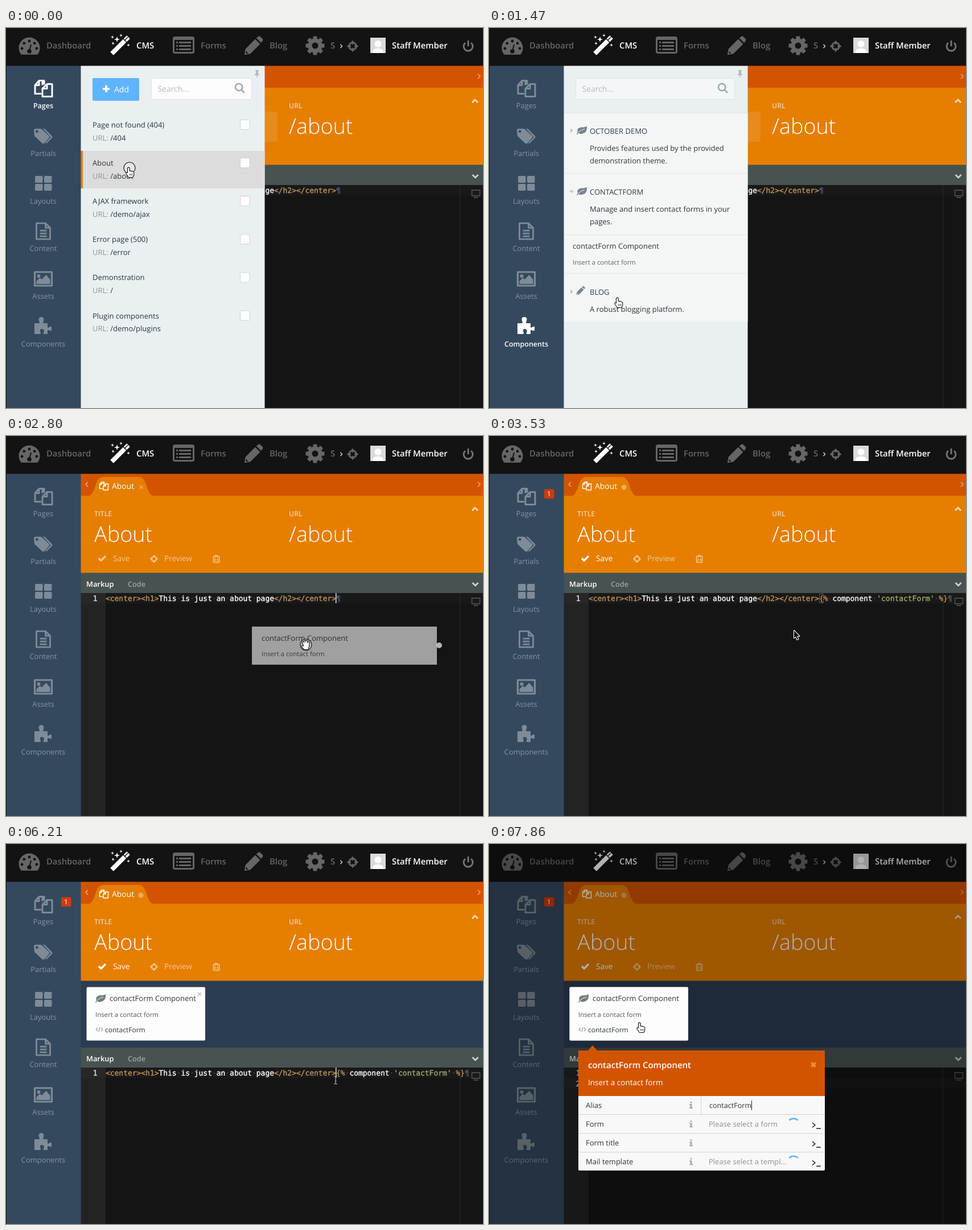
Write an HTML page with a canvas that moves like this. It is 838x668 px and loops after 8 s.

```html
<!DOCTYPE html>
<html lang="en">
<head>
<meta charset="utf-8">
<title>CMS editor</title>
<style>
html, body { margin: 0; width: 100%; height: 100%; overflow: hidden; background: #141414; }
canvas { display: block; }
</style>
</head>
<body>
<canvas id="stage" width="838" height="668"></canvas>
<script>
const ctx = document.getElementById('stage').getContext('2d');
// Unrounded glyph advances
ctx.textRendering = 'geometricPrecision';
const SANS = '"Open Sans", "Noto Sans", sans-serif';
const MONO = '12.94px "DejaVu Sans Mono", monospace';
const DIM = '#666', INK = '#2b373e', FADED = 'rgba(255,255,255,.57)';
const LOOP = 8000, STEP = 148, LAST = 53;

function text(s, x, y, size, color, weight = 400, align = 'left') {
  ctx.font = `${weight} ${size}px ${SANS}`;
  ctx.fillStyle = color;
  ctx.textAlign = align;
  ctx.fillText(s, x, y);
}

function box(x, y, w, h, color, r = 0, edge) {
  ctx.beginPath();
  ctx.roundRect(x, y, w, h, r);
  ctx.fillStyle = color;
  ctx.fill();
  if (edge) {
    ctx.strokeStyle = edge;
    ctx.lineWidth = 1;
    ctx.stroke();
  }
}

function dot(x, y, r, color) {
  ctx.beginPath();
  ctx.arc(x, y, r, 0, 7);
  ctx.fillStyle = color;
  ctx.fill();
}

// Filled when line is 0, otherwise stroked
function icon(d, x, y, color, line = 0, scale = 1) {
  ctx.save();
  ctx.translate(x, y);
  ctx.scale(scale, scale);
  const p = new Path2D(d);
  ctx.fillStyle = ctx.strokeStyle = color;
  ctx.lineWidth = line;
  ctx.lineJoin = 'round';
  if (line) ctx.stroke(p); else ctx.fill(p, 'evenodd');
  ctx.restore();
}

const ART = {
  pages: 'M-2-6V-14H-8L-15-6V9H-4M-15-6H-8V-14M-2 0L6-8H15V14H-2ZM-2 0H6V-8M-2-14H1V-7',
  tags: 'M-16-10Q-16-13-13-13H-4L-2-12L11 0Q12 2 11 3L2 13Q0 14-2 12L-15 0ZM-13-8a2.3 2.3 0 1 0 4.6 0a2.3 2.3 0 1 0-4.6 0M0-13H3L16 0Q17 2 16 3L6 13L4 12L13 3Q14 2 13 1Z',
  doc: 'M-12-14H4L12-6V14H-12ZM4-14V-6H12M-6-1H6M-6 4H6M-6 9H6',
  frame: 'M-15-12H15V12H-15Z',
  hills: 'M-12 9V4L-6-2L-3 1L5-7L12 1V9ZM-11-5a3 3 0 1 0 6 0a3 3 0 1 0-6 0',
  puzzle: 'M-15-4H-7Q-5-5-7-8Q-9-15-3-15Q3-15 1-8Q-1-5 1-4H8V3Q10 5 12 2Q16 1 15 6Q15 11 12 9Q9 7 8 9V15H1Q0 13 2 10Q1 6-2 6Q-6 6-5 10Q-3 13-5 15H-15Z',
  pencil: 'M-17 17L-15 6L3-12L12-3L-6 15ZM5-14L9-17Q11-18 13-16L17-12Q18-10 16-8L14-5ZM-14 10L-10 14L-14 15Z',
  cross: 'M-6 0a6 6 0 1 0 12 0a6 6 0 1 0-12 0M0-9V-3M0 3V9M-9 0H-3M3 0H9',
  leaf: 'M-9 7L-7 4Q-10-4 0-5Q6-5 9-7Q10 4 2 6Q-3 8-6 5L-8 8Z',
  pin: 'M-3-6H3V-5L2-4V0L5 3H.7V7H-.7V3H-5L-2 0V-4L-3-5Z',
  trash: 'M-6-4H6M-2-4V-6H2V-4M-5-4V6H5V-4M-2-1V4M2-1V4',
  code: 'M-3-3L-6 0L-3 3M3-3L6 0L3 3M1-4L-1 4',
  times: 'M-3-3L3 3M3-3L-3 3',
  up: 'M-5 3L0-2L5 3',
  down: 'M-5-3L0 2L5-3',
  left: 'M2-4L-2 0L2 4',
  right: 'M-2-4L2 0L-2 4',
  hand: 'M-4-7Q-4-8.3-2.7-8.3Q-1.3-8.3-1.3-6.5V-2Q0-3 1.3-1.8Q2.6-2.5 3.8-1.2Q6.2-1.5 6.2 1V4L4.5 8H-2.5L-6.5 2Q-7 0-5 .5L-4 1.5Z',
  fist: 'M-4 1L-6-4Q-5-6-3.6-4L-2.5-2L-3-6Q-1.8-8-.8-6L-.4-3L.4-7Q1.8-8 2.3-6L2-2L4-5Q6-5 5.4-3L5 3L3.5 8H-3L-7 3Q-7 1-4 3Z',
  arrow: 'M-4-8V5L-1 2.4L1.2 8L3.4 7L1 1.8H5.2Z',
  beam: 'M-3-7Q0-7 0-5Q0-7 3-7M0-5V5M-3 7Q0 7 0 5Q0 7 3 7M-1.5 2H1.5'
};

function header() {
  box(0, 0, 838, 66.5, '#131313');
  // Gauge
  ctx.beginPath();
  ctx.arc(41, 35, 18.5, 2.45, 0.69);
  ctx.closePath();
  ctx.fillStyle = DIM;
  ctx.fill();
  for (let i = 0; i < 5; i++) {
    const a = Math.PI * (1 + i / 4);
    dot(41 + 13 * Math.cos(a), 36 + 13 * Math.sin(a), 2.4, '#131313');
  }
  icon('M0 0L3-12', 41, 41, '#131313', 2);
  dot(41, 41, 3.8, '#131313');
  text('Dashboard', 71, 36, 14.8, DIM, 600);
  // Wand
  icon('M-15 15L14-14', 201, 30, '#fff', 8);
  icon('M5-11L11-5M13-14L7-8', 201, 30, '#131313', 1.5);
  for (const [x, y, r] of [[187, 16, 3], [195, 20, 5], [202, 13, 3], [188, 27, 3], [215, 30, 3]]) {
    const q = r / 4;
    icon(`M0-${r}L${q}-${q}L${r} 0L${q} ${q}L0 ${r}L-${q} ${q}L-${r} 0L-${q}-${q}Z`, x, y, '#fff');
  }
  text('CMS', 229, 36, 14.8, '#fff', 600);
  // List
  box(293, 15, 38, 30, DIM, 4);
  box(296, 21, 32, 21, '#131313');
  for (let y = 24; y < 40; y += 6) {
    box(299, y, 3, 3, DIM);
    box(304, y, 21, 3, DIM);
  }
  text('Forms', 342, 36, 14.8, DIM, 600);
  icon(ART.pencil, 435, 31, DIM, 0, .95);
  text('Blog', 463, 36, 14.8, DIM, 600);
  // Gear
  dot(543, 31, 12.8, DIM);
  for (let i = 0; i < 8; i++) {
    ctx.save();
    ctx.translate(543, 31);
    ctx.rotate(i * Math.PI / 4);
    box(-3.5, -16.5, 7, 6, DIM, 1);
    ctx.restore();
  }
  dot(543, 31, 5.5, '#131313');
  text('S', 570, 36, 14.8, DIM, 600);
  icon(ART.right, 589, 32, '#ddd', 1.7, .8);
  icon(ART.cross, 609, 32, DIM, 2.8, 1.05);
  // Avatar
  box(640, 17, 27, 27, '#dadada');
  dot(653.5, 28, 6, '#fff');
  icon('M-10 13Q-10 6-3 5H3Q10 6 10 13Z', 653.5, 31, '#fff');
  text('Staff Member', 678, 36, 14.8, '#fff', 600);
  icon('M-5-6A8 8 0 1 0 5-6M0-10V0', 812, 32, '#777', 2.8);
}

function sidebar(active, badge) {
  box(1, 66, 130.5, 602, '#34495e');
  const names = ['Pages', 'Partials', 'Layouts', 'Content', 'Assets', 'Components'];
  names.forEach((name, i) => {
    const on = i === active, c = on ? '#fff' : '#7e8b98', y = 106.5 + i * 83.4;
    if (i === 0) icon(ART.pages, 66, y, c, 3);
    if (i === 1) icon(ART.tags, 65, y, c);
    if (i === 2) for (let k = 0; k < 4; k++) box(51 + k % 2 * 16, 260 + (k >> 1) * 14, 13.5, 12, c, 2);
    if (i === 3) icon(ART.doc, 65.5, y + .5, c, 2.8);
    if (i === 4) {
      icon(ART.frame, 65.5, 441, c, 3.2);
      icon(ART.hills, 65.5, 441, c);
    }
    if (i === 5) icon(ART.puzzle, 65, 523, c);
    text(name, 65.5, 141 + i * 83.8, on ? 12.5 : 12.9, on ? '#fff' : '#8593a0', on ? 600 : 400, 'center');
  });
  if (badge) {
    box(97, 93.5, 17.5, 16.5, '#d23a0c', 2);
    text('1', 105.5, 106, 12, '#fff', 500, 'center');
  }
}

// The thin outline gives the heavier strokes of the editor face
function codeLine(parts, x, y) {
  ctx.font = MONO;
  ctx.textAlign = 'left';
  ctx.lineWidth = .4;
  const w = ctx.measureText('m').width;
  for (const [s, color] of parts) for (const ch of s) {
    if (ch === ' ') {
      ctx.fillStyle = '#555';
      ctx.fillText('·', x, y);
    } else {
      ctx.fillStyle = ctx.strokeStyle = color;
      ctx.fillText(ch, x, y);
      ctx.strokeText(ch, x, y);
    }
    x += w;
  }
}

const TAG = '#bd9157', END = ['¶', '#4b5568'];
const HTML = [['<center><h1>', TAG], ['This is just an about page', '#f8f8f8'], ['</h2></center>', TAG]];
const TWIG = [['{%', TAG], [' component ', '#f8f8f8'], ["'contactForm'", '#9bab65'], [' %}', TAG]];

function editor(n, top) {
  const dropped = n >= 24, split = n >= 44, y = top + 50;
  box(131, top + .5, 707, 36, '#475352');
  text('Markup', 141, top + 24.5, 12.9, '#fff', 600);
  text('Code', 214, top + 24.5, 12.7, '#9aa5a4', 600);
  icon(ART.down, 824.5, top + 21, '#ccd2d1', 2.8);
  box(131, top + 36, 707, 668, '#141414');
  box(131, top + 36, 44, 668, '#232323');
  box(797, top + 36, 1, 668, '#262626');
  box(131, top + 36 + (split ? 18.5 : 0), 707, 18.5, 'rgba(255,255,255,.02)');
  const digit = [['1', '#e2e2e2']];
  codeLine(digit, 152.7, y);
  if (split) {
    codeLine([['2', '#e2e2e2']], 152.7, y + 18.5);
    codeLine([...HTML, END], 175, y);
    codeLine([...TWIG, END], 175, y + 18.5);
  } else {
    codeLine([...HTML, ...(dropped ? TWIG : []), END], 175, y);
  }
  if (dropped && n < 40) {
    ctx.strokeStyle = '#555';
    ctx.lineWidth = 1;
    ctx.strokeRect(580.5, top + 37.5, 7, 16);
  }
  if ((n >= 17 && n < 24) || (n >= 40 && !split)) box(579, top + 36, 1.5, 18, '#ddd');
  if (split) box(175, top + 55, 1.5, 18, '#ddd');
  icon('M-7-6H7V4H-7ZM-4 7H4', 825.5, top + 51, '#4a4a4a', 1.8);
}

function card(x) {
  box(x + .5, 251.5, 208.5, 94, '#fdfdfd', 2);
  icon(ART.leaf, x + 25, 271, '#727f80');
  icon('M-6 4Q-1-1 5-2', x + 25, 271, '#fdfdfd', 1);
  text('contactForm Component', x + 41, 276, 13, INK);
  text('Insert a contact form', x + 16, 303.5, 11.4, '#4b5558');
  icon(ART.code, x + 23, 326, '#90999c', 1.2);
  text('contactForm', x + 33, 330.5, 12, INK);
}

function page(n, top) {
  const dirty = n >= 24, act = dirty ? '#fff' : FADED;
  box(131, 66, 707, 39, '#d35400');
  box(131, 105, 707, 140, '#e67e00');
  icon('M147 105Q153 101 157 88Q161 72 171 72H233Q243 72 247 88Q251 101 257 105Z', 0, 0, '#e67e00');
  icon(ART.left, 142, 85, '#f0a56d', 1.6);
  icon(ART.right, 831, 85, '#f0a56d', 1.6);
  icon(ART.pages, 172, 88, '#fff', 3, .5);
  text('About', 186, 93, 13.9, '#fff', 500);
  if (dirty) dot(237, 90, 4.5, '#efab5c');
  else icon(ART.times, 237.5, 90, '#f3bd80', 1.3, .9);
  icon(ART.up, 824, 128, '#f8dcbb', 2.8);
  text('TITLE', 155, 141, 12.3, '#f7cfa2', 600);
  text('URL', 497, 141, 12.3, '#f7cfa2', 600);
  if (n < 17) box(155, 147, 322, 53, 'rgba(255,255,255,.1)', 3);
  text('About', 155, 186, 37.8, '#fff', 300);
  text('/about', 497, 186, 37.8, '#fff', 300);
  icon('M-6 0L-2 4L6-4', 169, 215, act, 3.3);
  text('Save', 188, 220, 13.6, act, 500);
  icon(ART.cross, 260, 216, FADED, 2.6, .75);
  text('Preview', 278, 220, 13.6, FADED, 500);
  icon(ART.trash, 369.5, 216, FADED, 1.6);
  if (top > 240) {
    const x = n > 29 ? 141 : 140;
    box(131, 240.5, 707, top - 240, '#2b3d52');
    ctx.save();
    ctx.beginPath();
    ctx.rect(131, 240, 707, top - 240);
    ctx.clip();
    card(x);
    icon(ART.times, x + 199, 264, '#b5bcbf', 1.3);
    ctx.restore();
  }
  editor(n, top);
}

function panelBase(searchX, fill) {
  box(131, 66, 323.5, 602, '#eaf0f1');
  icon(ART.pin, 441, 80, '#b3b9ba');
  box(searchX + .5, 88.5, 431 - searchX, 37, fill, 2, '#dde2e3');
  text('Search...', searchX + 11.5, 111.5, 13.9, '#b4babb');
  icon('M-8-2a6.2 6.2 0 1 0 12.4 0a6.2 6.2 0 1 0-12.4 0M3 3L8 8', 411, 106, '#a4abac', 2.7);
}

function pagesPanel() {
  panelBase(255, '#fdfdfd');
  box(152, 88, 82, 40, '#5fb5fd', 2);
  icon('M-6 0H6M0-6V6', 176, 107, '#fff', 3.5);
  text('Add', 190, 112.5, 14, '#fff', 500);
  const rows = [['Page not found (404)', '/404'], ['About', '/about'], ['AJAX framework', '/demo/ajax'],
    ['Error page (500)', '/error'], ['Demonstration', '/'], ['Plugin components', '/demo/plugins']];
  rows.forEach(([name, url], i) => {
    const y = i * 67.1;
    if (i === 1) {
      box(131, 216, 323.5, 66, '#dcdcdc');
      box(131, 216, 4, 66, '#e67e00');
    }
    text(name, 152, 175 + y, 13, INK);
    text('URL:', 152, 197.5 + y, 13, '#8d9596');
    text(url, 183.3, 197.5 + y, 13, INK);
    box(411.5, 161.5 + y, 16.5, 17, '#fff', 2, '#ccd1d2');
  });
}

function group(y, name, lines, open) {
  icon(open ? 'M-4-2H4L0 3Z' : 'M-2-4L3 0L-2 4Z', 145, y, '#c0c6c8');
  if (name === 'BLOG') icon(ART.pencil, 161, y - 2, '#76848f', 0, .45);
  else {
    icon(ART.leaf, 163, y - 1, '#76848f');
    icon('M-6 4Q-1-1 5-2', 163, y - 1, '#f4f6f6', 1);
  }
  text(name, 177, y + 5.5, 13, '#2c3e50');
  lines.forEach((s, i) => text(s, 177, y + 35 + i * 22.7, 13, INK));
}

function componentsPanel() {
  panelBase(152, '#f4f7f7');
  box(131, 149, 323.5, 367, '#f4f6f6');
  for (const y of [149, 255, 363, 431]) box(131, y, 323, 1, '#e0e6e7');
  group(180.5, 'OCTOBER DEMO', ['Provides features used by the provided', 'demonstration theme.']);
  group(287.5, 'CONTACTFORM', ['Manage and insert contact forms in your', 'pages.'], true);
  text('contactForm Component', 147, 388, 13, INK);
  text('Insert a contact form', 147, 415.5, 11.4, '#5a6468');
  group(463.5, 'BLOG', ['A robust blogging platform.']);
}

function ghost(x, y) {
  dot(x + 329, y + 33, 5, '#b4b4b4');
  box(x, y, 325, 67, 'rgba(236,236,236,.65)');
  text('contactForm Component', x + 17, y + 24.5, 13, '#26323a');
  text('Insert a contact form', x + 17, y + 52, 11.4, '#333c42');
}

function popup(n) {
  icon('M-8 8L0-1L8 8Z', 182, 355, '#d35400');
  box(157, 363, 433, 211, '#f8f8f8', 2);
  box(157, 363, 433, 80, '#d35400', [2, 2, 0, 0]);
  text('contactForm Component', 174, 393.5, 15, '#fff', 600);
  text('Insert a contact form', 174, 423.5, 13.5, '#fff');
  icon(ART.times, 570, 388, '#ee8a35', 3.2, 1.2);
  const rows = [['Alias'], ['Form', 'Please select a form'], ['Form title'], ['Mail template', 'Please select a templ...']];
  rows.forEach(([label, hint], i) => {
    const y = 459 + i * 33.1;
    if (i) {
      box(157, y - 17, 433, 1, '#d0d4d5');
      icon('M-7-4L-2 0L-7 4M0 6H8', 575, y + 2, '#2c3e50', 1.7);
    }
    text(label, 170, y + 5, 13, INK);
    icon('M-1.5-6H1.5V-3.5H-1.5ZM-3-2H1.5V4H3V6H-3V4H-1.5V0H-3Z', 355, y, '#a6adaf');
    if (hint) {
      text(hint, 386, y + 5, 13, '#8b9294');
      const a = -Math.PI / 2 + (n - LAST) * 1.2;
      ctx.beginPath();
      ctx.arc(535, y + 2, 11.5, a - .75, a + .75);
      ctx.strokeStyle = '#62b7f8';
      ctx.lineWidth = 2.6;
      ctx.stroke();
    }
  });
  box(372, 443, 1, 32, '#d0d4d5');
  text('contactForm', 387, 464, 12.6, INK);
  box(461, 451, 1, 17, '#222');
}

// Pointer path: step, x, y
const PATH = [[0, 218, 254], [1, 214, 262], [3, 128, 440], [4, 110, 483], [5, 92, 530], [6, 98, 556],
  [8, 180, 535], [9, 218, 500], [10, 228, 483], [12, 226, 410], [13, 226, 397], [14, 240, 395],
  [16, 360, 372], [19, 527, 367], [22, 527, 362], [24, 540, 350], [28, 562, 331], [30, 580, 405],
  [31, 560, 412], [34, 405, 413], [38, 575, 415], [42, 579, 415], [46, 579, 415], [50, 267, 323], [54, 267, 323]];

function pointerAt(n) {
  const i = PATH.findIndex(p => p[0] > n);
  const [a, x, y] = PATH[i - 1], [b, u, v] = PATH[i], k = (n - a) / (b - a);
  return [x + (u - x) * k, y + (v - y) * k];
}

function pointer(n, x, y) {
  const drag = n >= 13 && n < 24;
  const kind = drag ? 'fist' : n >= 30 && n < 47 ? 'beam' : (n >= 24 && n < 30) || n === 47 || n === 48 ? 'arrow' : 'hand';
  if (drag || n === 0 || n === 50) {
    ctx.beginPath();
    ctx.arc(x - (drag ? 0 : 1), y - (drag ? 0 : 8), 10, 0, 7);
    ctx.fillStyle = 'rgba(255,255,255,.3)';
    ctx.fill();
    ctx.strokeStyle = '#222';
    ctx.lineWidth = 1.2;
    ctx.stroke();
  }
  if (kind === 'beam') return icon(ART.beam, x, y, '#aaa', 1.2);
  icon(ART[kind], x, y, kind === 'arrow' ? '#fff' : '#111', 2.2);
  icon(ART[kind], x, y, kind === 'arrow' ? '#111' : '#fff');
  if (kind === 'hand') icon('M-.5 2V5.5M1.7 2V5.5M3.8 2V5.5', x, y, '#222', .8);
}

function barTop(n) {
  if (n < 25) return 240;
  return n > 28 ? 357 : [270, 308, 340, 355][n - 25];
}

function draw(now) {
  const n = Math.min(LAST, Math.floor((now % LOOP + 30) / STEP));
  const [x, y] = pointerAt(n);
  box(0, 0, 838, 668, '#141414');
  page(n, barTop(n));
  if (n < 3) pagesPanel();
  else if (n >= 6 && n < 17) componentsPanel();
  sidebar(n < 3 ? 0 : n < 5 ? 4 : n < 17 ? 5 : -1, n >= 24);
  header();
  if (n >= 13 && n < 24) ghost(x - 95, y - 32);
  if (n >= 51) {
    box(0, 0, 838, 668, `rgba(0,0,0,${n === 51 ? .15 : .31})`);
    card(141);
    if (n >= 52) popup(n);
  }
  pointer(n, x, y);
}

const start = performance.now();
function tick() {
  draw(performance.now() - start);
  requestAnimationFrame(tick);
}
tick();
</script>
</body>
</html>
```
